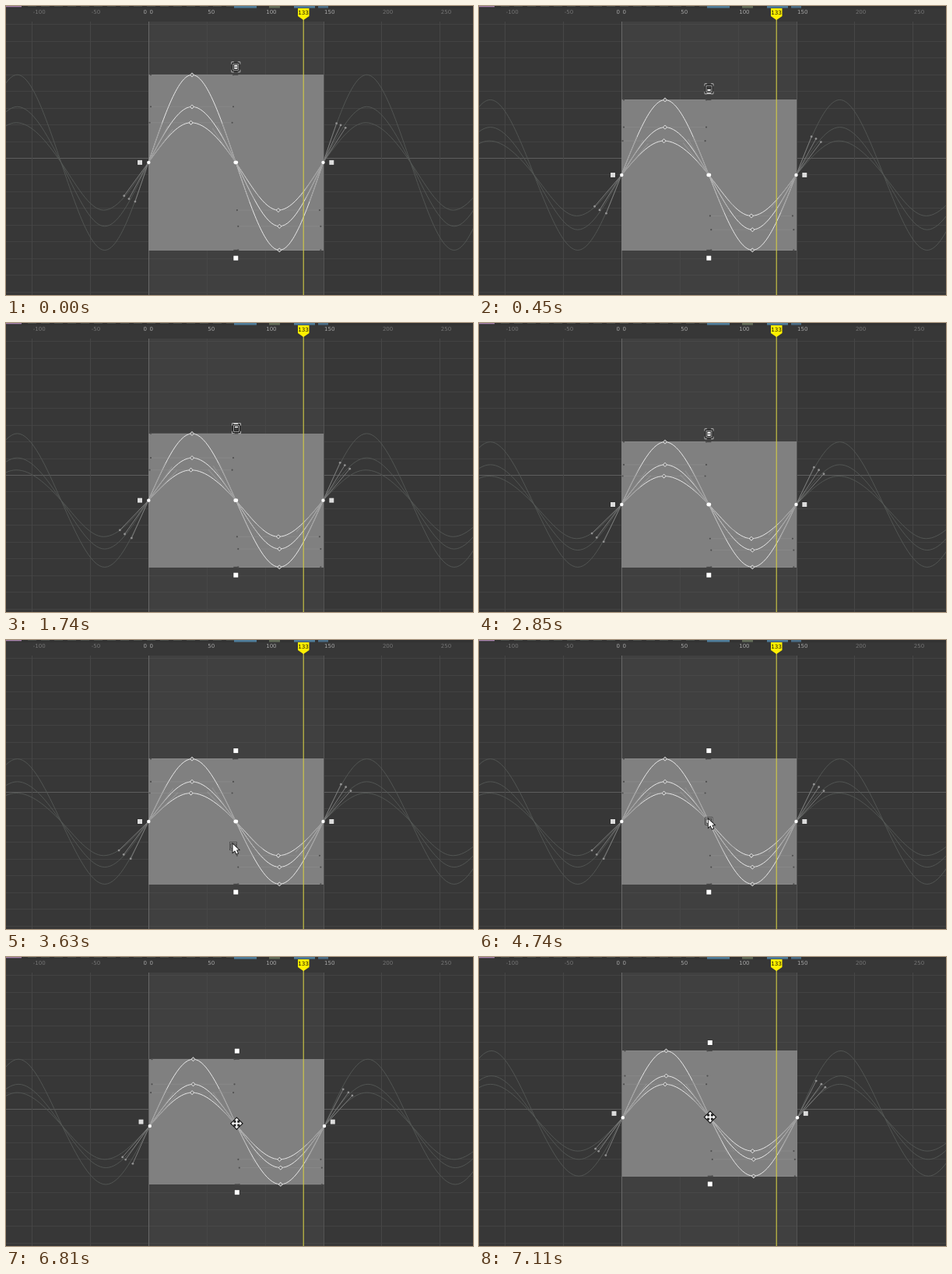
Write an HTML page with a canvas that moves like this. It is 600 px wide and 371 px high and loops after 7.14 s.

```html
<!DOCTYPE html>
<html lang="en">
<head>
<meta charset="utf-8">
<title>Curve editor</title>
<style>
html, body { margin: 0; width: 100%; height: 100%; overflow: hidden; background: #373737; }
canvas { display: block; width: 600px; height: 371px; }
</style>
</head>
<body>
<canvas id="stage" width="600" height="371"></canvas>
<script>
const ctx = document.getElementById('stage').getContext('2d');
const LOOP = 7140, STEP = 30;
const UNIT = 10.72, ZERO = 195.5;      // pixels per value, y of value 0
const FRAME = 1.497, X0 = 183.5;       // pixels per frame, x of frame 0
const PERIOD = 224.5, TANGENT = 53;
const NODE_X = [183, 239, 295.3, 351.3, 407.5];
const DRAG = 5850;

// Relative peak and trough heights inside the box, and x offset of those keys
const CURVES = [[1, 0, 0], [0.818, 0.136, 0], [0.727, 0.228, -1.4]];

// Pointer path: time, x, y
const PATH = [
  [0, 295.3, 77], [450, 295.5, 105], [720, 295.5, 111], [1080, 295.5, 123],
  [1620, 295.5, 123], [1740, 296, 134], [1950, 296, 138], [2340, 295.5, 141],
  [3180, 295.5, 141], [3390, 294, 205], [3630, 291.5, 262], [3900, 291, 266],
  [4620, 294.5, 232], [4740, 294.8, 230], [4950, 295, 231], [5220, 295, 231],
  [5250, 295.5, 233], [5820, 295.5, 233], [6330, 295.5, 228],
  [6540, 295.8, 221], [7110, 297, 205.5]
];

const yOf = v => ZERO - v * UNIT;
const xOf = f => X0 + f * FRAME;
const snap = v => Math.floor(v + 0.499);

function pointerAt(t) {
  let i = 0;
  while (i < PATH.length - 2 && PATH[i + 1][0] <= t) i++;
  const [t0, x0, y0] = PATH[i], [t1, x1, y1] = PATH[i + 1];
  const k = Math.min(1, (t - t0) / (t1 - t0));
  return { x: x0 + (x1 - x0) * k, y: y0 + (y1 - y0) * k };
}

function makeCurve(peak, mid, trough, offset, dx) {
  const x = NODE_X.map((n, i) => n + dx + (i % 2 ? offset : 0));
  const y = [mid, peak, mid, trough, mid];
  const up = 1.46 * (peak - mid) / (x[1] - x[0]);
  const down = 1.46 * (mid - trough) / (x[4] - x[3]);
  return { x, y, slopes: [up, 0, -(up + down) / 2, 0, down] };
}

function stateAt(t) {
  const p = pointerAt(t), low = -11;
  const pulled = t < 2400 ? p.y : 141;
  const high = 10 - Math.round((pulled - 77) / UNIT);
  const dragging = t >= DRAG;
  const lift = dragging ? Math.round((233 - p.y) / UNIT) : 0;
  const dx = dragging ? Math.round((p.x - 295.5) / 1.5) * 1.5 : 0;
  const value = r => {
    const v = low + (high - low) * r;
    return yOf((dragging ? snap(v) : v) + lift);
  };
  const mid = value(0.5);
  return {
    p, dx, mid, top: yOf(high + lift), bottom: yOf(low + lift),
    curves: CURVES.map(([a, b, offset]) => makeCurve(value(a), mid, value(b), offset, dx))
  };
}

function rect(x, y, w, h, color) {
  ctx.fillStyle = color;
  ctx.fillRect(x, y, w, h);
}

function line(x0, y0, x1, y1, color, width = 1) {
  ctx.strokeStyle = color;
  ctx.lineWidth = width;
  ctx.beginPath();
  ctx.moveTo(x0, y0);
  ctx.lineTo(x1, y1);
  ctx.stroke();
}

function dot(x, y, rx, color, ry = rx) {
  ctx.fillStyle = color;
  ctx.beginPath();
  ctx.ellipse(x, y, rx, ry, 0, 0, 7);
  ctx.fill();
}

function shape(points, fill, stroke, width = 1) {
  ctx.beginPath();
  points.forEach(([x, y]) => ctx.lineTo(x, y));
  ctx.closePath();
  if (stroke) { ctx.strokeStyle = stroke; ctx.lineWidth = width; ctx.stroke(); }
  if (fill) { ctx.fillStyle = fill; ctx.fill(); }
}

function drawGrid() {
  rect(0, 0, 600, 371, '#373737');
  rect(X0, 20, 224.5, 351, '#404040');
  for (let i = -8; i <= 8; i++) {
    const y = Math.round(ZERO + i * UNIT * 2 - 0.5) + 0.5;
    line(0, y, 600, y, i ? '#424242' : '#5d5d5d');
    if (i) line(X0, y, xOf(150), y, '#484848');
  }
  for (let f = -100; f <= 250; f += 50) {
    const x = Math.floor(xOf(f)) + 0.5;
    line(x, 20, x, 371, f === 0 ? '#686868' : f === 150 ? '#545454' : '#464646');
  }
}

function drawRuler() {
  rect(0, 0, 600, 19, '#373737');
  rect(0, 0, 600, 3, '#323232');
  rect(0, 0, 20, 1.3, '#a985ae');
  for (let x = 28; x < 290; x += 17) rect(x, 0, 11, 1, '#484b48');
  [[293, 29, '#4f7d9b'], [338, 14, '#626c58'], [370, 27, '#4f7d9b'], [401, 13, '#4a6d86']]
    .forEach(([x, w, c]) => rect(x, 0, w, 2.6, c));
  ctx.font = '7px "DejaVu Sans", sans-serif';
  ctx.textAlign = 'left';
  for (let f = -100; f <= 250; f += 50) {
    const inside = f >= 0 && f <= 150;
    ctx.fillStyle = inside ? '#a6a6a6' : '#747474';
    ctx.fillText(f, xOf(f) + 1, 10.2);
  }
  ctx.fillStyle = '#a6a6a6';
  ctx.fillText('0', 176.5, 10.2);
}

function drawPlayhead() {
  line(382.2, 16, 382.2, 371, '#d2cb44', 1.1);
  shape([[375, 3], [389.5, 3], [389.5, 13], [382.2, 18], [375, 13]], '#fff000');
  ctx.font = '7.2px "DejaVu Sans", sans-serif';
  ctx.textAlign = 'center';
  ctx.fillStyle = '#1c1a00';
  ctx.fillText('133', 382, 11);
}

function traceCurve({ x, y, slopes }, shift, color, width) {
  ctx.strokeStyle = color;
  ctx.lineWidth = width;
  ctx.beginPath();
  ctx.moveTo(x[0] + shift, y[0]);
  for (let i = 0; i < 4; i++) {
    const a = x[i] + shift, b = x[i + 1] + shift, h = (b - a) / 3;
    ctx.bezierCurveTo(a + h, y[i] + slopes[i] * h,
      b - h, y[i + 1] - slopes[i + 1] * h, b, y[i + 1]);
  }
  ctx.stroke();
}

function drawTangents({ x, y, slopes }) {
  const arm = (i, side, color, width) => {
    const w = side * TANGENT / Math.hypot(1, slopes[i]);
    const end = [x[i] + w, y[i] + w * slopes[i]];
    line(x[i], y[i], ...end, color, width);
    return end;
  };
  const soft = 'rgba(148,148,148,.8)';
  arm(0, 1, soft, 1.3);
  arm(2, -1, soft, 1.3);
  arm(2, 1, soft, 0.8);
  arm(4, -1, soft, 1.3);
  [1, 3].forEach(i => [-1, 1].forEach(side => {
    const [ex, ey] = arm(i, side, 'rgba(150,150,150,.4)', 0.8);
    dot(ex, ey, 1.1, '#505050');
  }));
  [[0, -1], [4, 1]].forEach(([i, side]) => {
    const [ex, ey] = arm(i, side, '#808080', 0.9);
    dot(ex, ey, 1.4, '#919191');
  });
}

function keyDiamond(x, y) {
  const r = 2.1;
  shape([[x - r, y], [x, y - r], [x + r, y], [x, y + r]], '#777', '#fff', 1.1);
}

function drawHandle(x, y, color = '#fff') {
  rect(x - 3.5, y - 3.5, 7, 7, 'rgba(30,30,30,.5)');
  rect(x - 3, y - 3, 6, 6, color);
}

function drawScaleCursor(p) {
  const x = p.x, y = p.y + 1.3;
  [[-1, -1], [1, -1], [-1, 1], [1, 1]].forEach(([a, b]) => {
    const cx = x + a * 5.5, cy = y + b * 6.5;
    line(cx, cy, cx - a * 3, cy, '#b8b8b8');
    line(cx, cy, cx, cy - b * 3, '#b8b8b8');
  });
  ctx.strokeStyle = '#161616';
  ctx.lineWidth = 2.8;
  ctx.strokeRect(x - 3.5, y - 4, 7, 8);
  ctx.strokeStyle = '#c8c8c8';
  ctx.lineWidth = 0.8;
  ctx.strokeRect(x - 3.5, y - 4, 7, 8);
  line(x - 2, y, x + 2, y, '#333');
}

function drawArrow({ x, y }) {
  ctx.strokeStyle = '#222';
  ctx.lineWidth = 2;
  ctx.strokeRect(x - 3.5, y - 1.5, 8, 8);
  ctx.strokeStyle = '#bbb';
  ctx.lineWidth = 0.7;
  ctx.strokeRect(x - 3.5, y - 1.5, 8, 8);
  const tip = [[0, 0], [0, 10.5], [2.6, 8.2], [4.6, 12.6], [6.4, 11.8], [4.5, 7.5], [7.6, 7.3]];
  shape(tip.map(([a, b]) => [x + a, y + b]), '#fff', '#111', 1.7);
}

function drawMoveCursor({ x, y }) {
  const arm = [[-0.9, -0.9], [-0.9, -3.9], [-2.8, -3.9], [0, -6.8], [2.8, -3.9], [0.9, -3.9]];
  const points = [];
  for (let i = 0; i < 4; i++) {
    const c = [1, 0, -1, 0][i], s = [0, 1, 0, -1][i];
    arm.forEach(([a, b]) => points.push([x + a * c - b * s, y + a * s + b * c]));
  }
  shape(points, '#fff', '#181818', 2.4);
}

function draw(t) {
  const { p, dx, mid, top, bottom, curves } = stateAt(t);
  const [l, , m, , r] = NODE_X.map(x => x + dx);
  const centre = (top + bottom) / 2;
  const boxTop = Math.round(top - 0.3), boxEnd = Math.round(bottom + 0.3);

  drawGrid();
  curves.forEach(c => [-PERIOD, PERIOD].forEach(s => traceCurve(c, s, '#555856', 0.9)));
  rect(Math.floor(l), boxTop, 225, boxEnd - boxTop, '#808080');
  curves.forEach(c => traceCurve(c, 0, '#ececec', 0.95));
  curves.forEach(drawTangents);
  rect(m - 3, top - 0.6, 6, 1.2, '#4a4a4a');
  rect(m - 3, bottom - 0.6, 6, 1.2, '#4a4a4a');
  drawRuler();
  drawPlayhead();

  curves.forEach(({ x, y }) => [1, 3].forEach(i => keyDiamond(x[i], y[i])));
  dot(l + 0.3, mid, 2.2, '#fff');
  dot(m, mid, 2.9, '#fff', 2.4);
  dot(r, mid, 2.2, '#fff');
  drawHandle(m, top - 10.5);
  drawHandle(m, bottom + 10.2);
  drawHandle(l - 11, centre, '#dcdcdc');
  drawHandle(r + 10.8, centre, '#dcdcdc');

  if (t < 3210) drawScaleCursor(p);
  else if (t < 5250) drawArrow(p);
  else drawMoveCursor(p);
}

const start = performance.now();
function tick() {
  const t = (performance.now() - start) % LOOP;
  draw(Math.floor(t / STEP) * STEP);
  requestAnimationFrame(tick);
}
tick();
</script>
</body>
</html>
```
